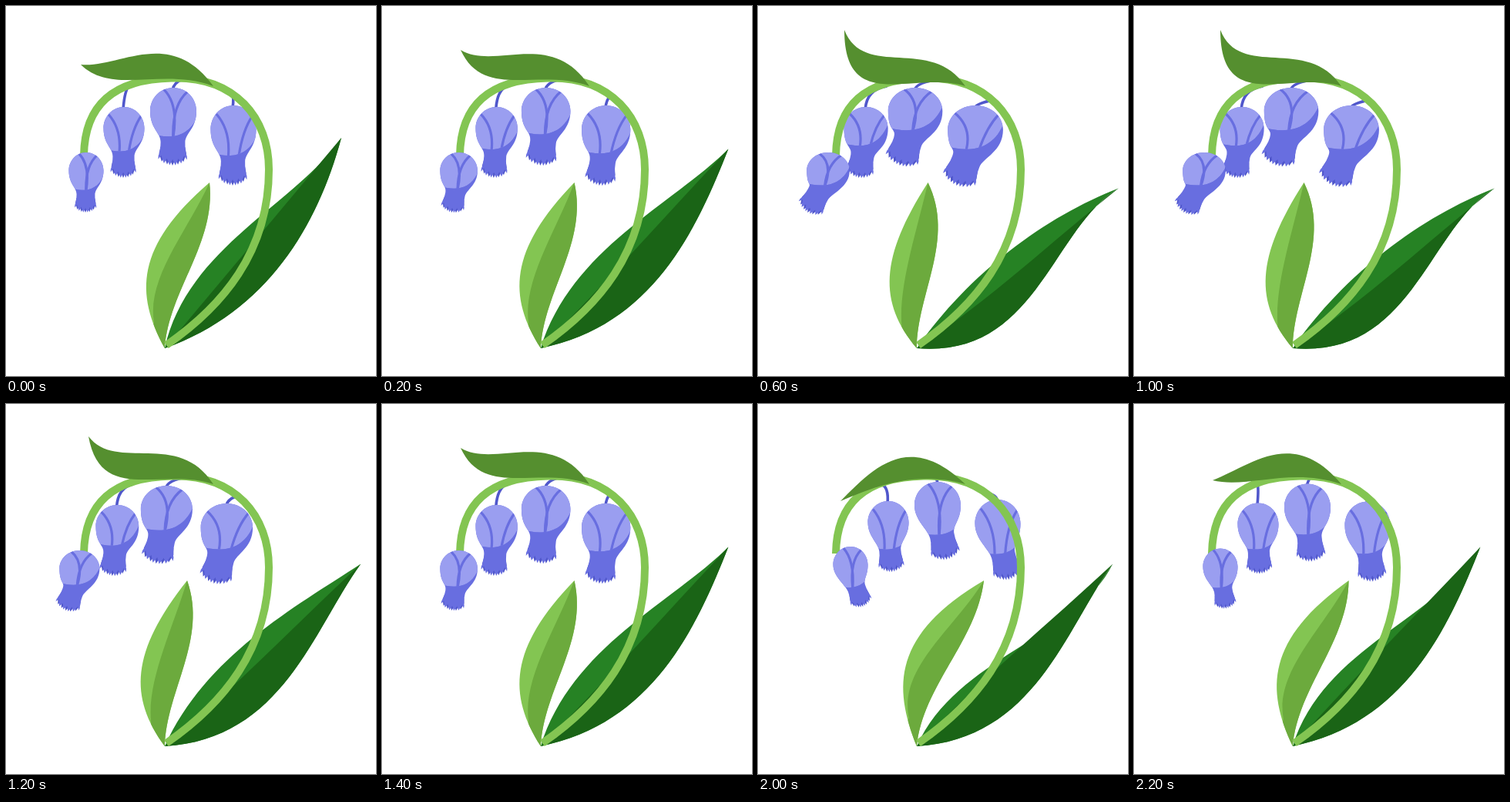
These frames come from a looping animation (480 by 480 pixels, 2.4 s). An HTML page with a canvas:

```html
<!DOCTYPE html>
<html lang="en">
<head>
<meta charset="utf-8">
<title>Swaying bellflower</title>
<style>
html, body { margin: 0; width: 100%; height: 100%; overflow: hidden; background: #fff; }
canvas { display: block; width: 100vmin; height: 100vmin; }
</style>
</head>
<body>
<canvas id="stage" width="480" height="480"></canvas>
<script>
const ctx = document.getElementById('stage').getContext('2d');
const STEP = 200, STEPS = 12;
const BASE = [206, 444];
const STEM = new Path2D('M101 194C102 130 138 95 215 93.5C298 91 341 146 341 212C341 320 280 390 208 440');
const color = {
  petal: '#9a9ef0', bell: '#686ee0', stalk: '#5057cb', stem: '#83c552',
  top: '#558f2f', young: '#83c552', youngShade: '#6caa3d',
  old: '#268224', oldShade: '#1a6416'
};
const bells = [
  { x: 104, y: 190, w: 22.5, len: 78, swing: 1.2 },
  { x: 153, y: 131, w: 26.5, len: 92, swing: 0.4, root: [160, 104] },
  { x: 217, y: 106, w: 30, len: 101, swing: 0.9, root: [229, 95] },
  { x: 295, y: 129, w: 29.5, len: 104, swing: 1.1, root: [293, 114] }
];

// Sway in steps: four to the left and back, then two to the right and back.
function swayAt(ms) {
  const k = Math.floor(ms / STEP) % STEPS;
  return k <= 8 ? Math.min(3.6, 4 - Math.abs(k - 4)) : Math.abs(k - 10) - 2;
}

function fill(c, path) {
  ctx.fillStyle = c;
  ctx.fill(path);
}

function stroke(c, width, path) {
  ctx.strokeStyle = c;
  ctx.lineWidth = width;
  ctx.stroke(path);
}

// Places a point by its share along the line a-b and its offset from it.
function along([ax, ay], [bx, by]) {
  const dx = bx - ax, dy = by - ay;
  return (t, off) => [ax + dx * t + dy * off, ay + dy * t - dx * off];
}

// Each edge is two bends, each a share along the axis and an offset.
function blade(tip, base, [a, b, c, d], [e, f, g, h]) {
  const at = along(tip, base), p = new Path2D();
  p.moveTo(...tip);
  p.bezierCurveTo(...at(a, b), ...at(c, d), ...base);
  p.bezierCurveTo(...at(g, h), ...at(e, f), ...tip);
  return p;
}

function drawOld(s) {
  const m = Math.abs(s);
  const tip = [435 + 16 * m - 1.7 * s * s, 171 + 11 * m + 3.6 * s * s];
  const upper = [0.29, 0.03 - 0.04 * s, 0.66, -0.175 + 0.008 * s * s];
  const lower = [0.3, 0.14 - 0.02 * s * s, 0.66, 0.2 + 0.04 * m];
  const rib = [0.33, 0, 0.66, 0.01 * s];
  fill(color.old, blade(tip, BASE, upper, lower));
  fill(color.oldShade, blade(tip, BASE, rib, lower));
}

function drawYoung(s) {
  const tip = [264 - 14.5 * s, 229];
  const outer = [0.47, -0.32 + 0.02 * s, 0.74, -0.25];
  const inner = [0.33, 0.13 + 0.02 * s, 0.67, -0.065 + 0.015 * s];
  const leaf = blade(tip, BASE, outer, inner);
  fill(color.young, leaf);
  ctx.save();
  ctx.clip(leaf);
  const at = along(tip, BASE), shade = new Path2D();
  shade.moveTo(...tip);
  shade.bezierCurveTo(...at(0.31, -0.05), ...at(0.63, -0.21 + 0.025 * s), ...at(0.87, -0.1));
  shade.lineTo(...at(1.1, -0.1));
  shade.lineTo(...at(1.1, 0.4));
  shade.lineTo(...at(0, 0.4));
  fill(color.youngShade, shade);
  ctx.restore();
}

function drawTop(s) {
  const tip = [97 + 5 * Math.abs(s), 76 - 21 * s + 2 * s * s];
  const upper = [0.29, 0.02 - 0.1 * s, 0.61, 0.39 - 0.05 * s];
  const lower = [0.27, -0.19 - 0.13 * s, 0.6, 0.08 - 0.045 * s];
  fill(color.top, blade(tip, [269, 104], upper, lower));
}

function frill(p, at, w, shift) {
  const teeth = 5;
  for (let i = 0; i <= teeth * 2; i++) {
    const u = 1 - i / teeth;
    const tip = i % 2 === shift ? 1 : 0.74;
    p.lineTo(...at(0.62 * w * u, tip - 0.26 * u * u));
  }
}

function bellShape(b, s) {
  const neck = [b.x + b.tilt * 0.5, b.y + 0.7 * b.len];
  const end = [b.x + b.tilt, b.y + b.len];
  const size = Math.hypot(end[0] - neck[0], end[1] - neck[1]);
  const place = along(neck, end);
  const at = (side, t) => place(t, side / size);
  const wide = b.y + 0.3 * b.len, full = b.y + (0.53 + 0.015 * s) * b.len;
  const n = 0.53 * b.w;

  const back = new Path2D();
  back.moveTo(...at(n, 0.2));
  frill(back, at, b.w * 0.95, 1);
  back.lineTo(...at(-n, 0.2));

  const p = new Path2D();
  p.moveTo(b.x, b.y);
  p.bezierCurveTo(b.x + 0.58 * b.w, b.y, b.x + b.w, b.y + 0.14 * b.len, b.x + b.w, wide);
  p.bezierCurveTo(b.x + b.w, full, ...at(n, -0.4), ...at(n, 0));
  p.quadraticCurveTo(...at(n, 0.4), ...at(0.62 * b.w, 0.6));
  frill(p, at, b.w, 0);
  p.lineTo(...at(-0.62 * b.w, 0.6));
  p.quadraticCurveTo(...at(-n, 0.4), ...at(-n, 0));
  p.bezierCurveTo(...at(-n, -0.4), b.x - b.w, full, b.x - b.w, wide);
  p.bezierCurveTo(b.x - b.w, b.y + 0.14 * b.len, b.x - 0.58 * b.w, b.y, b.x, b.y);
  return { front: p, back };
}

function drawPetals(b, s, paired) {
  const h = 0.62 * b.len * (1 - 0.04 * s);
  const at = (u, v) => [b.x + u * b.w, b.y + v * h];
  const petal = new Path2D();
  petal.moveTo(...at(-1.1, -0.1));
  petal.lineTo(...at(-1.1, 0.93));
  petal.bezierCurveTo(...at(-0.3, 1.06), ...at(0.6, 1.08), ...at(1.04, 0.6 - 0.07 * s));
  petal.lineTo(...at(1.1, -0.1));
  ctx.clip(petal);
  fill(color.petal, petal);

  const vein = (x, y, cx, cy, ex) => {
    const p = new Path2D();
    p.moveTo(...at(x, y));
    p.quadraticCurveTo(...at(cx, cy), ...at(ex, 1.03));
    stroke(color.bell, 3.2, p);
  };
  const lean = 0.17 * b.tilt / b.w;
  if (paired) {
    vein(-0.75, 0.17, -0.12, 0.5, -0.22 + lean);
    vein(0.85, 0.2, 0.4, 0.5, 0.24 + lean);
  } else {
    vein(-0.42, 0.03, 0.24, 0.34, lean);
    vein(0.62, 0.08, -0.05, 0.36, lean);
  }
}

function drawStalk(b, s) {
  const reach = Math.max(s, 0);
  const x = b.root[0] + 2.5 * reach, y = b.root[1] + (b.root[0] > 280 ? 3 * reach : 0);
  const p = new Path2D();
  p.moveTo(x, y);
  p.quadraticCurveTo(b.x + 1, y + 4, b.x - 1, b.y + 3);
  stroke(color.stalk, 3.6, p);
}

function drawBell(i, s) {
  const o = bells[i], left = Math.max(s, 0), right = Math.min(s, 0);
  const b = {
    ...o,
    x: o.x - 4.3 * left - 8 * right,
    y: o.y + 2.5 * right,
    w: o.w * (1 + 0.065 * left * o.swing),
    tilt: -1 - 7.2 * s * o.swing
  };
  if (o.root) drawStalk(b, s);
  const { front, back } = bellShape(b, s);
  fill(color.stalk, back);
  fill(color.bell, front);
  ctx.save();
  ctx.clip(front);
  drawPetals(b, s, i % 2 === 1);
  ctx.restore();
}

function draw(s) {
  ctx.fillStyle = '#fff';
  ctx.fillRect(0, 0, 480, 480);
  drawOld(s);
  drawYoung(s);
  for (const i of [3, 2, 1]) drawBell(i, s);
  stroke(color.stem, 10, STEM);
  drawTop(s);
  drawBell(0, s);
}

const start = performance.now();
function tick() {
  draw(swayAt(performance.now() - start));
  requestAnimationFrame(tick);
}
tick();
</script>
</body>
</html>
```
